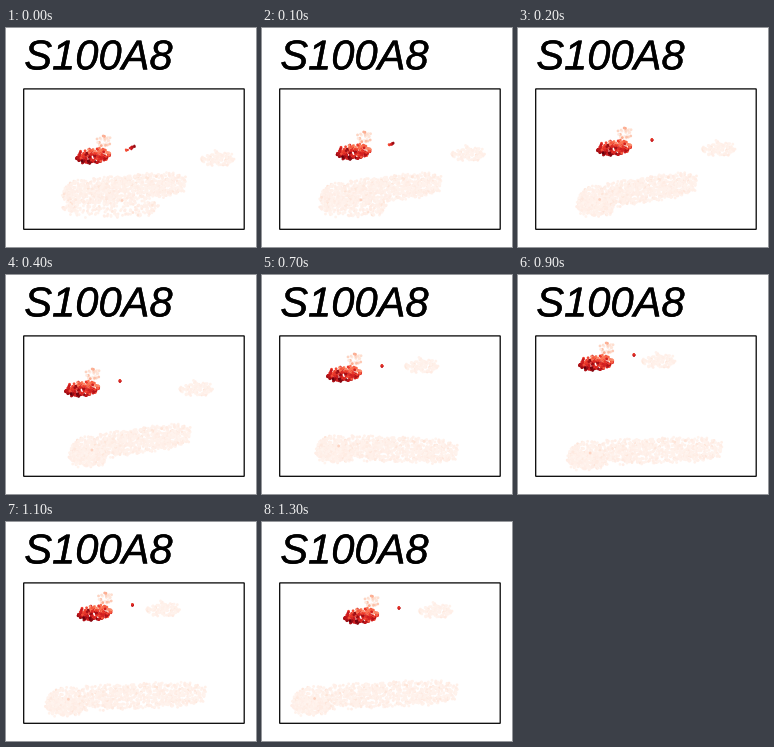
These frames come from a looping animation (250 by 219 pixels, 1.5 s). A matplotlib script:

```python
import numpy as np
import matplotlib.pyplot as plt
from matplotlib.animation import FuncAnimation
from matplotlib.patches import Rectangle
from matplotlib.patheffects import withStroke

W, H, DPI = 250, 219, 100
STEP, FRAMES = 100, 15

# Pose at each tick; halves lie midway between two views.
POSES = [0, 0.5, 1, 1, 1.5, 2, 2, 3, 3, 4, 4, 4.5, 4.5, 5, 5]

# Centres in each view; the band also has a width and a tilt.
CORE = [(87, 128), (96, 120), (56, 108), (82, 99), (78, 88), (99, 94)]
PATCH = [(212, 131), (201, 121), (180, 107), (160, 91), (141, 86), (174, 89)]
BAND = [(118, 160, 122, -10), (119, 163, 118, -18), (129, 171, 121, -16),
        (125, 174, 140, 5), (127, 176, 153, -5), (113, 173, 164, -8)]

rng = np.random.default_rng(8)


def at(keys, pose):
    return [np.interp(pose, range(len(keys)), k) for k in zip(*keys)]


class Cloud:
    """Dots spread over a rounded strip that can move, grow and tilt."""

    def __init__(self, count, tone, size=4.0, power=2, rough=0.6):
        self.s, self.t = rng.uniform(-1, 1, (2, count))
        self.t *= (1 - np.abs(self.s) ** power) ** 0.5
        self.noise = rng.normal(0, rough, (count, 2))
        self.dots = ax.scatter(self.s, self.t, s=size, c=tone(self.s, self.t),
                               cmap="Reds", vmin=0, vmax=1, linewidths=0)

    def place(self, x, y, w, h, tilt=0):
        xy = np.column_stack([x + self.s * w / 2,
                              y + self.t * h / 2 + self.s * tilt / 2])
        self.dots.set_offsets(xy + self.noise)


def pale(s, t):
    return 0.01 + rng.exponential(0.02, s.size)


def mixed(s, t):
    return 0.04 + 0.6 * rng.beta(1, 4, s.size)


def hot(s, t):
    shade = 0.68 + 0.2 * t - 0.14 * s
    return np.clip(shade + rng.normal(0, 0.12, s.size), 0.2, 1)


def dark(s, t):
    return 0.75 + 0.2 * s


fig = plt.figure(figsize=(W / DPI, H / DPI), dpi=DPI, facecolor="white")
ax = fig.add_axes([0, 0, 1, 1])
ax.set(xlim=(0, W), ylim=(H, 0))
ax.axis("off")
ax.add_patch(Rectangle((17.7, 60.9), 220.5, 140.4, fill=False,
                       ec="black", lw=0.9, snap=False))
ax.text(18.3, 41.4, "S100A8", size=30, style="italic", family="Liberation Sans",
        path_effects=[withStroke(linewidth=0.3, foreground="black")])

band = Cloud(1000, pale, power=8, rough=0.9)
foot = Cloud(260, pale, power=4, rough=0.9)
patch = Cloud(110, pale, rough=0.8)
tail = Cloud(26, mixed, rough=1.2)
core = Cloud(210, hot, power=3)
speck = Cloud(12, dark, size=2.6, rough=0.3)


def update(k):
    p = POSES[k]
    open_ = max(1 - p, 0)  # the first view is spread out, later ones fold up

    x, y, w, tilt = at(BAND, p)
    band.place(x, y, w, 24, tilt)
    span = 36 + 60 * open_
    foot.place(x - w / 2 + span / 2, y - tilt / 2 + 7 + 8 * open_, span, 17)

    x, y = at(PATCH, p)
    patch.place(x, y, 32, 13)

    x, y = at(CORE, p)
    core.place(x, y, 33, 14, -4)
    tail.place(x + 11, y - 14, 13, 13)
    speck.place(x + 38, y - 8, 10 * open_, 3 * open_, -6 * open_)


update(0)
anim = FuncAnimation(fig, update, frames=FRAMES, interval=STEP,
                     repeat=True, repeat_delay=0, blit=False)
plt.show()
```
